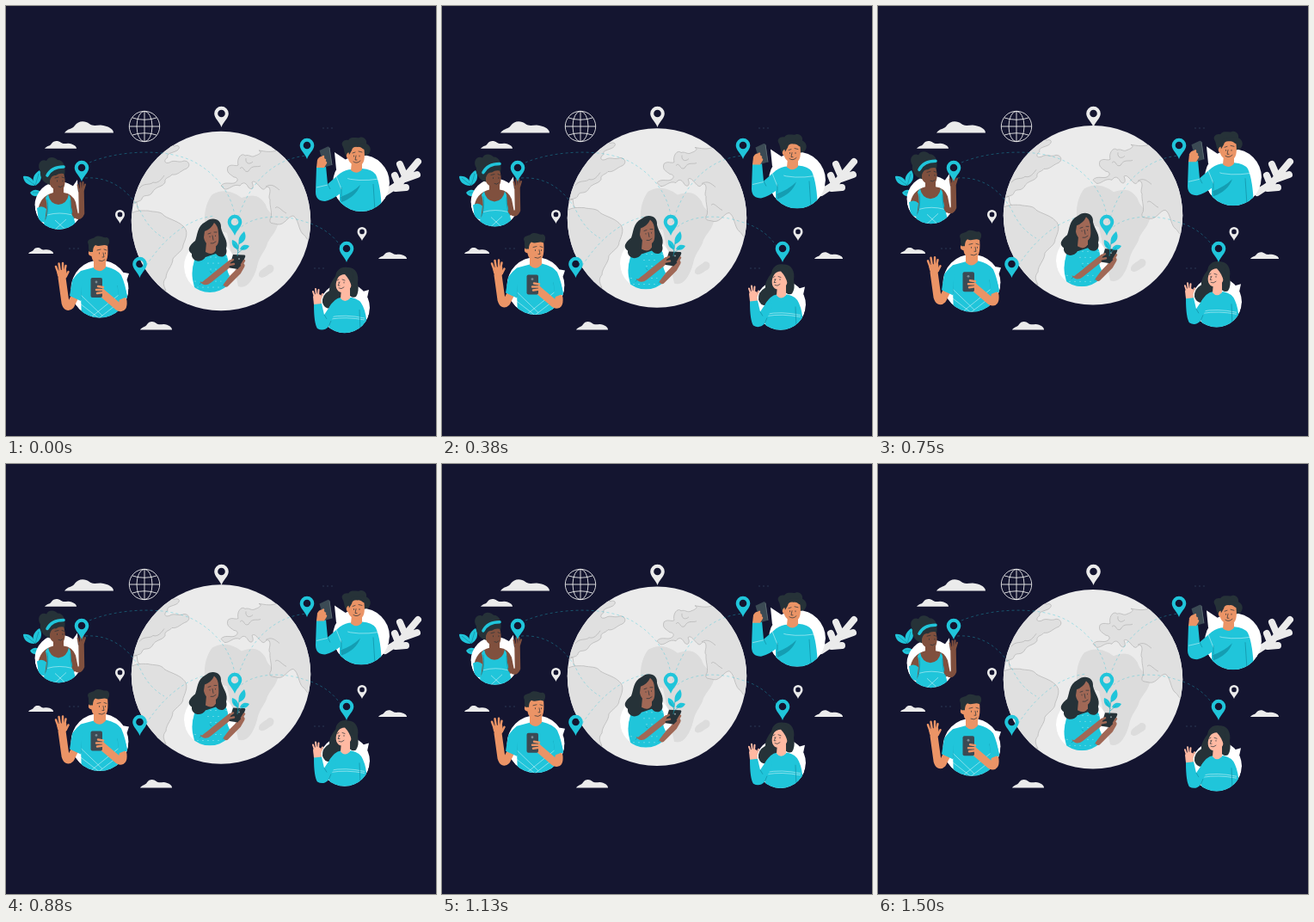
These frames come from a looping animation (500x500 px, 1540 ms). An HTML page:

```html
<!DOCTYPE html>
<html lang="en">
<head>
<meta charset="utf-8">
<title>Connected people</title>
<style>
  html, body { margin: 0; width: 100%; height: 100%; overflow: hidden; background: #141530; }
  svg { display: block; width: 100%; height: 100%; }
  .teal { fill: #20c5da; }
  .deep { fill: #149db2; }
  .pale { fill: #ebebeb; }
  .white { fill: #fff; }
  .hair { fill: #263238; }
  .phone { fill: #3b4a54; }
  .orange { fill: #eb9466; }
  .peach { fill: #ffb9a2; }
  .brown { fill: #80503e; }
  .tan { fill: #a06856; }
  .land path { fill: #e0e0e0; stroke: #aaa; stroke-width: .6; }
  .routes { fill: none; stroke: #20c5da; stroke-width: .7; stroke-dasharray: 3 3; opacity: .5; }
  .line { fill: none; stroke: #fff; stroke-width: .6; opacity: .75; }
  .ink { fill: none; stroke: #263238; stroke-width: .7; stroke-linecap: round; }
  .fold { fill: none; stroke: #118da3; stroke-width: .7; }
  .limb { fill: none; stroke-linecap: round; stroke-linejoin: round; }
  .finger { fill: none; stroke-linecap: round; stroke-width: 2.5; }
</style>
</head>
<body>
<svg viewBox="0 0 500 500">
  <defs>
    <path id="cloud" d="M0 13.5C4 8 9 9.5 12 5C16-1 24-1 29 3C33 6 37 4.5 42 4.5C51 5.5 57 9 57 13.5Z"/>
    <path id="pin" fill-rule="evenodd" d="M0 0C-2-6.2-8.3-10.2-8.3-16A8.3 8.3 0 0 1 8.3-16C8.3-10.2 2-6.2 0 0ZM-4.3-16A4.3 4.3 0 0 0 4.3-16A4.3 4.3 0 0 0-4.3-16Z"/>
    <g id="dots"><circle r=".9"/><circle cx="5" r=".9"/><circle cx="10" r=".9"/></g>
    <clipPath id="earth"><circle cx="250" cy="250" r="104.2"/></clipPath>
    <clipPath id="c1"><path d="M0 0H500V232H89.5A28 28 0 0 1 33.5 232H0Z"/></clipPath>
    <clipPath id="c2"><path d="M0 0H500V329H142.5A33.5 33.5 0 0 1 75.5 329H0Z"/></clipPath>
    <clipPath id="c3"><path d="M0 0H500V206H446A33 33 0 0 1 380 206H0Z"/></clipPath>
    <clipPath id="c4"><path d="M0 0H500V351H423A29.3 29.3 0 0 1 364.4 351H0Z"/></clipPath>
    <clipPath id="c5"><path d="M0 0H500V303H267A30 30 0 0 1 207 303H0Z"/></clipPath>
  </defs>

  <g class="pale" id="clouds"></g>

  <g fill="none" stroke="#ebebeb" stroke-width=".9">
    <circle cx="161" cy="140" r="17.7"/>
    <ellipse cx="161" cy="140" rx="9" ry="17.7"/>
    <path d="M161 122.4V157.6M143.4 140H178.6M147 130Q161 134.5 175 130M147 150Q161 145.5 175 150"/>
  </g>

  <g fill="#25304b">
    <use href="#dots" x="369" y="142"/><use href="#dots" x="359" y="305"/><use href="#dots" x="74" y="282"/>
  </g>

  <g class="teal">
    <path d="M34 209C29 203 32 195 39 191C43 198 41 205 34 209Z"/>
    <path d="M33 209C24 209 20 203 20 198C27 197 33 201 33 209Z"/>
    <path d="M39 219C34 223 30 221 28 217C32 213 36 213 40 216Z"/>
    <path class="fold" d="M34 209L38 195M33 208L23 200M38 217L31 217"/>
  </g>

  <path class="limb" stroke="#ebebeb" stroke-width="8" d="M441 217L458 206L479 181M452 197L456 207M458 184L464 198M464 201L478 196M453 212L465 211"/>

  <g class="float">
    <circle class="pale" cx="250" cy="250" r="104.2"/>
    <g class="land" clip-path="url(#earth)">
      <path d="M146 232C152 226 157 228 158 224C160 218 166 223 170 217C174 209 182 211 185 205C184 199 190 200 193 196C200 197 202 192 210 189C215 186 213 180 207 180C200 183 196 178 190 182C184 184 183 179 188 176C186 171 194 171 199 168C204 164 200 161 196 163L180 157L140 200Z"/>
      <path d="M155 212C160 205 167 209 171 205C177 207 181 201 184 197" style="fill:none"/>
      <path d="M147 228L152 228L153 235L156 240" style="fill:none"/>
      <path d="M144 242C152 237 158 238 165 238C172 240 180 238 184 244C190 248 200 250 206 256C213 262 209 270 206 278C206 285 198 288 194 294C194 302 186 308 186 316C181 322 184 326 186 331L140 310Z"/>
      <path style="stroke:none;fill:#dcdcdc" d="M240 219C250 213 262 214 274 223C290 217 296 222 302 231C304 240 312 243 316 250C317 262 306 268 303 279C299 288 294 292 292 303C288 318 280 330 270 326L257 264C248 260 236 264 231 253C230 238 234 226 240 219Z"/>
      <path style="stroke:none;fill:#dcdcdc" d="M294 314C293 307 301 305 305 301C311 299 314 306 309 310C304 312 299 319 294 314Z"/>
      <path d="M250 209C254 204 260 207 265 206C271 204 270 199 265 199C260 195 256 194 258 187C263 183 266 187 270 185C268 177 274 170 278 174C283 172 285 177 290 174C296 172 298 169 294 168C302 169 308 171 317 167L370 210L354 272C350 274 349 267 345 265C340 260 340 247 334 244C328 244 324 255 316 254C310 252 306 254 307 248C311 244 306 232 307 225C304 222 309 216 306 211C301 208 302 216 297 212C292 207 289 202 286 205C289 211 286 215 282 211C278 203 274 206 272 209C264 206 260 214 254 213Z"/>
      <path d="M272 189C277 184 276 195 282 192C286 184 292 188 296 186M279 177C278 183 283 185 287 181M302 210C309 206 313 210 318 214M313 235C316 231 320 238 326 241" style="fill:none"/>
    </g>
  </g>

  <g class="routes">
    <path d="M97 182C130 168 190 164 222 183C244 196 262 217 266 244"/>
    <path d="M92 200C122 198 143 215 156 238Q166 260 184 270"/>
    <path d="M157 312C176 278 207 247 243 244"/>
    <path d="M266 266C276 246 314 239 348 251C374 258 390 275 396 294"/>
    <path d="M266 263C273 222 301 178 350 174"/>
  </g>

  <g class="float">
    <!-- woman with headband -->
    <g clip-path="url(#c1)">
      <path class="white" d="M33.5 232A28 28 0 1 1 89.5 232A28 28 0 0 1 33.5 232M76 212L83 202L84 219Z"/>
      <path class="brown" d="M55 208H67V217Q77 218 81 228L84 243L76 250H42L37 239Q39 221 55 217Z"/>
      <path class="teal" d="M49 219Q51 230 61 231Q71 230 73 219L75 223Q75 233 78 243L83 263H41L47 244Q49 233 46 223Z"/>
      <path class="teal" d="M36 235Q42 231 47 236L45 252L38 250Z"/>
      <path class="line" d="M48 243Q62 239 77 243M57 249L69 260M70 248L57 260"/>
      <path class="fold" d="M75 226Q75 238 78 245M48 225Q50 238 46 248"/>
    </g>
    <path class="limb" stroke="#80503e" stroke-width="6.5" d="M80 242Q85 248 88 241L87.5 215"/>
    <path class="finger" stroke="#80503e" style="stroke-width:2" d="M85 214L83.5 208M87 213L86.5 205.5M89 213L89.5 205M90 214L92 207.5"/>
    <path class="hair" d="M40 192C35 184 41 177 47 180C51 173 58 177 60 179C67 179 70 187 68 197L66 206L51 208C44 206 39 200 40 192Z"/>
    <path class="brown" d="M51 203Q53 196 58 197Q62 194 67 195C70 202 69 214 63 215C57 215 52 211 51 207Z"/>
    <path class="limb" stroke="#20c5da" stroke-width="3.6" stroke-linecap="butt" d="M48 197Q53 187 67 187"/>
    <path class="ink" d="M57 200L61 199M65 199L68 200M59.5 203V204M66 203V204M61 210Q64 212 66 209"/>

    <!-- man with phone, left -->
    <g clip-path="url(#c2)">
      <path class="white" d="M75.5 329A33.5 33.5 0 1 1 142.5 329A33.5 33.5 0 0 1 75.5 329M132 309L143 311L139 323Z"/>
      <path class="teal" d="M102 304L116 303Q129 306 134 313Q139 324 141 339L132 343L130 366H88L87 337L75 333Q77 315 87 308Z"/>
      <path class="line" d="M86 346L108 363L130 346M87 336L112 360M131 336L100 361"/>
      <path class="fold" d="M87 324V342M130 325L132 342"/>
    </g>
    <path class="orange" d="M102 294H116V304Q109 312 102 305Z"/>
    <path class="limb" stroke="#eb9466" stroke-width="9" d="M80 338L75 348Q71 352 69 345L65 316"/>
    <path class="limb" stroke="#eb9466" stroke-width="9" d="M136 343Q137 353 131 350L111 333"/>
    <path class="teal" d="M77 319Q82 311 89 309L87 343L74 337Z"/>
    <path class="teal" d="M129 312Q137 317 141 338L131 342Z"/>
    <path class="orange" d="M60 314L59 308L70 306L71 315L66 320Z"/>
    <path class="finger" stroke="#eb9466" d="M61 311L58 303M63 309L61.5 299.5M66 309L66 299M68 309L69.5 302M70 314L72.5 309"/>
    <rect class="phone" x="98.5" y="316" width="13.5" height="23" rx="2"/>
    <circle cx="105" cy="321" r="1.4" fill="#7b8a92"/>
    <path class="finger" stroke="#eb9466" d="M113 327L107 326M113 330L105 330M113 333L106 334"/>
    <path class="orange" d="M99 283L101 276L118 277C119 288 119 299 111 301C104 301 100 296 99.5 291Q95 290 96 286Q97 283 99 285Z"/>
    <path class="hair" d="M97 286C95 281 97 279 95 275C95 270 101 271 103 269C108 265 113 270 117 269C121 270 121 276 118 279C113 276 109 281 104 278Q101 280 101 286Z"/>
    <path class="ink" d="M106 284L110 283M114 283L117 284M108.5 287V288M115.5 287V288M113 287L114 292H112M108 296Q112 298 115 295"/>

    <!-- man with phone, right -->
    <g clip-path="url(#c3)">
      <path class="white" d="M380 206A33 33 0 1 1 446 206A33 33 0 0 1 380 206M384 190L382 170L397 180Z"/>
      <path class="teal" d="M388 195Q395 190 402 190L414 189Q426 190 430 196Q436 209 437 240H388Z"/>
      <path class="deep" d="M389 222Q403 217 412 208Q407 222 390 228Z"/>
      <path class="line" d="M391 199Q409 205 434 201"/>
      <path class="fold" d="M427 207L429 238"/>
    </g>
    <path class="teal" d="M361 187Q366 183 372 186L374 207L388 195Q396 193 398 203L390 217Q380 225 371 227Q360 227 360 216Z"/>
    <path class="line" d="M361 211L374 208M384 198L390 213"/>
    <path class="fold" d="M374 207L377 213M390 211V221"/>
    <path class="orange" d="M402 181H414V190Q408 197 401 191Z"/>
    <path class="phone" d="M364.5 168L374 163.5Q376 163 376.5 165L379 185L370 187.5Z"/>
    <path d="M376 165L379 185" fill="none" stroke="#5a6870"/>
    <path class="orange" d="M361 188L362 179Q365 173 370 176L373 183L370 188Z"/>
    <path class="finger" stroke="#eb9466" d="M364 180L369 175M366 182L371 179M367 184L372 182"/>
    <path class="hair" d="M397 176C393 173 394 169 392 164C388 158 394 155 398 156C401 151 408 154 411 153C416 151 420 156 419 160C425 163 425 169 421 173L410 176Z"/>
    <path class="orange" d="M399 170Q400 164 404 163L416 164C418 176 417 185 410 186C403 186 399 182 398 178Q394 175 397 171Z"/>
    <path class="hair" d="M399 173C397 165 400 161 405 160L418 159L418 167C414 167 413 163 409 164Q403 163 402 168Z"/>
    <path class="ink" d="M403 171L406 170M410 169L414 170M404.5 174V175M411 174V175M407 174L406 179H408M404 181Q408 184 412 180"/>

    <!-- woman waving -->
    <g clip-path="url(#c4)">
      <path class="white" d="M364.4 351A29.3 29.3 0 1 1 423 351A29.3 29.3 0 0 1 364.4 351M408 334L422 330L419 344Z"/>
      <path class="hair" d="M384 313Q375 324 376 331Q367 336 368 345Q371 354 380 351Q393 346 390 326Z"/>
      <path class="teal" d="M376 350Q382 340 389 339H402Q412 341 415 349Q421 362 419 382H376Z"/>
      <path class="line" d="M376 362Q394 358 417 363M378 364Q395 361 417 365"/>
      <path class="fold" d="M411 353L412 378"/>
    </g>
    <path class="teal" d="M358 347Q362 342 367 346L370 359L378 347Q384 343 384 354L375 373Q369 379 362 375Q358 369 358 347Z"/>
    <path class="fold" d="M370 359L373 364M378 366L375 373"/>
    <path class="peach" d="M358 347L357 338Q360 332 366 336L367 346Z"/>
    <path class="finger" stroke="#ffb9a2" style="stroke-width:2" d="M359 338L357 332M361 337L360 329M363 337L363.5 330M366 340L368 335"/>
    <path class="hair" d="M384 318C381 309 389 302 397 304C406 303 411 312 409 322Q411 332 407 338Q402 341 396 333Z"/>
    <path class="peach" d="M390 328H400V340Q394 346 389 340Z"/>
    <path class="peach" d="M385 318Q388 311 395 310Q397 316 402 320C403 327 398 333 391 333C384 333 382 325 385 318Z"/>
    <path class="hair" d="M384 317C385 309 390 305 397 305L404 310L402 327Q400 318 394 312Q389 312 384 317Z"/>
    <path class="ink" d="M385 319L387 318M391 318L394 319M387 321V322M393 321V322M388 321L386 325H388M387 328Q390 330 393 327"/>

    <!-- woman in the centre -->
    <g clip-path="url(#c5)">
      <circle class="white" cx="237" cy="303" r="30"/>
      <path class="teal" d="M228 284L247 282Q257 286 258 295L256 336H221L217 318Q214 297 228 284Z"/>
      <path class="fold" d="M230 305L239 310M252 300V326M229 319L225 324"/>
      <g id="spots" fill="#fff" opacity=".7"></g>
    </g>
    <path class="limb" stroke="#a06856" stroke-width="7" d="M256 323L270 309L274 302"/>
    <path class="teal" d="M248 287Q260 291 257 307L260 314L251 326Z"/>
    <path class="limb" stroke="#a06856" stroke-width="7" d="M228 318Q231 323 236 319L261 299"/>
    <path class="teal" d="M219 295Q228 293 234 304L239 312L228 321Q220 320 217 311Z"/>
    <path class="hair" d="M232 251C240 244 251 248 250 258C252 267 259 273 256 282C259 291 249 295 244 288L232 292C227 300 215 297 216 288C209 283 215 277 220 273C223 266 222 256 232 251Z"/>
    <path class="tan" d="M233 275L244 275V284Q240 291 232 286Z"/>
    <path class="tan" d="M231 262Q239 259 242 252Q247 256 247 264C248 274 247 280 241 280C235 280 231 275 230 269Z"/>
    <path class="ink" d="M235 265L238 264M242 263L245 263M237 268V268.6M243.5 267V267.6M240 267L241 272M238 276Q241 277 244 274"/>
    <path class="hair" d="M264 289L277 289.5Q279 290 278 292L273 304Q272 306 270 306L260 304.5Q259 304 260 302Z"/>
    <circle cx="271" cy="294" r="1" fill="#8a979d"/>
    <path class="finger" stroke="#a06856" d="M259 298L264 295M260 301L265 300M274 301L277 296M271 306L275 302"/>
  </g>

  <g class="teal">
    <path d="M271 277C269 269 274 265 277 262C280 268 279 274 271 277Z"/>
    <path d="M272 283C274 277 279 277 283 279C281 283 277 285 272 283Z"/>
    <path d="M270 283C264 282 262 277 263 272C269 274 271 278 270 283Z"/>
    <path d="M269 291L271 275M270 287L277 281M270 285L265 277" fill="none" stroke="#159fb4" stroke-width=".6"/>
  </g>
  <g id="pins"></g>
</svg>
<script>
  const $ = id => document.getElementById(id);
  const clouds = [[68, 134, 1, 1], [45, 156.8, .65, .67], [26, 281, .51, .52], [433, 286, .58, .59], [156, 366.8, .65, .72]];
  const pins = [[88, 204, 1], [350, 178, 1], [266, 267, 1], [155.5, 316, 1], [396, 298, 1],
                [250.5, 141, 1, 'pale'], [132.5, 253, .66, 'pale'], [414, 273, .66, 'pale']];
  $('clouds').innerHTML = clouds.map(([x, y, w, h]) =>
    `<use href="#cloud" transform="translate(${x} ${y}) scale(${w} ${h})"/>`).join('');
  $('pins').innerHTML = pins.map(([x, y, s, tone = 'teal']) =>
    `<use href="#pin" class="${tone}" transform="translate(${x} ${y}) scale(${s})"/>`).join('');

  let spots = '';
  for (let i = 0; i < 40; i++) {
    const row = Math.floor(i / 7);
    spots += `<circle cx="${220 + i % 7 * 6 + row % 2 * 3}" cy="${292 + row * 7}" r=".55"/>`;
  }
  $('spots').innerHTML = spots;

  // Steady rise and fall, 24 steps per second.
  const LOOP = 1540, SPEED = .385, PEAK = 17.7;
  const floats = document.querySelectorAll('.float');
  function draw(now) {
    const step = Math.floor((now % LOOP + 5) * .024) % 37;
    const y = SPEED * (Math.abs(step - PEAK) - PEAK);
    floats.forEach(g => g.setAttribute('transform', `translate(0 ${y.toFixed(2)})`));
  }
  const start = performance.now();
  function tick() {
    draw(performance.now() - start);
    requestAnimationFrame(tick);
  }
  tick();
</script>
</body>
</html>
```
